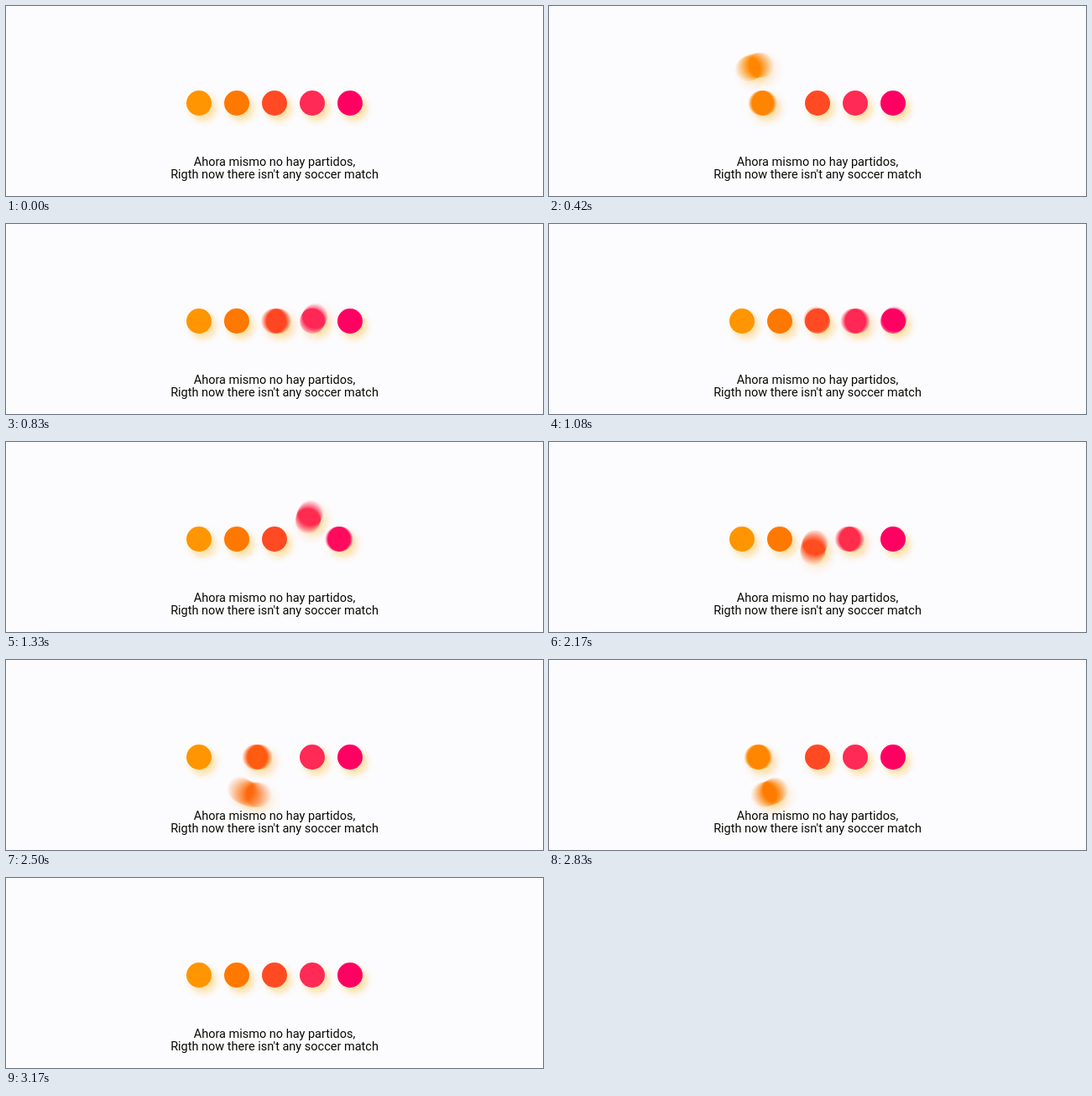
An HTML page with a canvas for the animation above (3260 ms loop, 640 px wide and 227 px high).

```html
<!DOCTYPE html>
<html lang="es">
<head>
<meta charset="utf-8">
<style>
html, body { margin: 0; overflow: hidden; background: #fcfcfe; }
canvas { display: block; }
</style>
</head>
<body>
<canvas id="stage" width="640" height="227"></canvas>
<script>
const W = 640, H = 227, LOOP = 3260, FRAME = 1000 / 12;
const START = 40, PASS = 1564;             // rest before the first pass, length of one pass
const LEFT = 230, GAP = 45, BASE = 116, BALL = 15;
const LIFT = 17, ARC = Math.hypot(GAP / 2, LIFT), SWING = Math.atan2(GAP / 2, -LIFT);
const SHUTTER = 38, SAMPLES = 12;
const COLORS = [[255, 149, 0], [255, 120, 0], [255, 74, 36], [255, 42, 86], [255, 0, 98]];

const ctx = document.getElementById('stage').getContext('2d');
const scene = Object.assign(document.createElement('canvas'), { width: W, height: H });
const pen = scene.getContext('2d');

const clamp = (v, lo, hi) => Math.min(hi, Math.max(lo, v));
const ease = q => 0.35 * (1 - Math.cos(Math.PI * q)) + 0.3 * q;

// The colour depends on where the ball is along the row.
function colorAt(x) {
  const p = clamp((x - LEFT) / GAP, 0, 4), i = Math.min(3, Math.floor(p));
  return `rgb(${COLORS[i].map((c, j) => Math.round(c + (COLORS[i + 1][j] - c) * (p - i)))})`;
}

function ball(x, y = BASE) {
  pen.fillStyle = colorAt(x);
  pen.beginPath();
  pen.arc(x, y, BALL, 0, 7);
  pen.fill();
}

// One ball slides along the row; each ball it meets swings around it.
function drawScene(t) {
  const u = clamp((t - START) / PASS, 0, 2);
  const slide = 2 * (1 - Math.cos(Math.PI * u));
  const k = Math.min(3, Math.floor(slide));
  const angle = SWING * (1 - 2 * ease(slide - k));
  const side = u < 1 ? -1 : 1;

  pen.shadowColor = 'transparent';
  pen.fillStyle = '#fcfcfe';
  pen.fillRect(0, 0, W, H);
  pen.shadowColor = 'rgba(255, 180, 30, 0.42)';
  pen.shadowBlur = 9;
  pen.shadowOffsetX = 5;
  pen.shadowOffsetY = 6;
  for (let i = 0; i < 5; i++) if (i < k || i > k + 1) ball(LEFT + i * GAP);
  ball(LEFT + slide * GAP);
  ball(LEFT + (k + 0.5) * GAP + ARC * Math.sin(angle),
       BASE + side * (LIFT + ARC * Math.cos(angle)));
}

function render(t) {
  for (let i = 0; i < SAMPLES; i++) {      // running average gives motion blur
    drawScene(t + SHUTTER * ((i + 0.5) / SAMPLES - 0.5));
    ctx.globalAlpha = 1 / (i + 1);
    ctx.drawImage(scene, 0, 0);
  }
  ctx.globalAlpha = 1;
  ctx.fillStyle = '#0a0a04';
  ctx.font = '14.5px Roboto, sans-serif';
  ctx.textAlign = 'center';
  ctx.fillText('Ahora mismo no hay partidos,', 320, 191.3);
  ctx.fillText("Rigth now there isn't any soccer match", 320, 205.8);
}

const begin = performance.now();
function tick() {
  const t = (performance.now() - begin) % LOOP;
  render(Math.min(38, Math.floor((t + 4) / FRAME)) * FRAME);
  requestAnimationFrame(tick);
}
tick();
</script>
</body>
</html>
```
